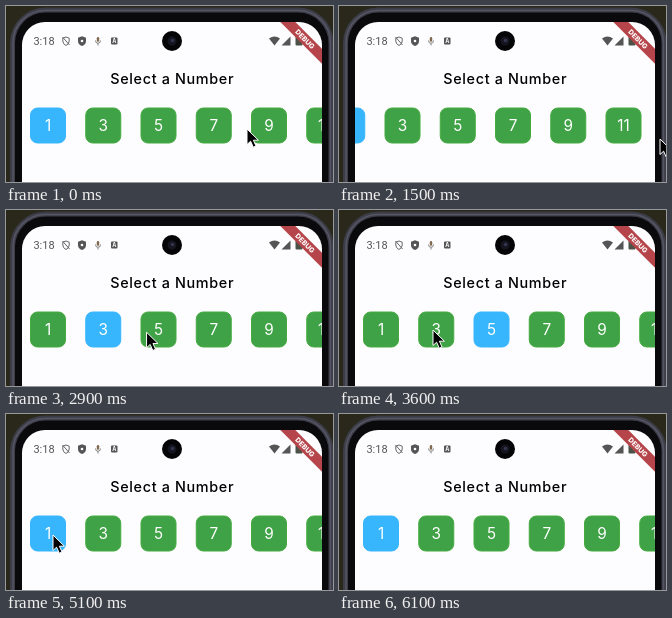
An HTML page for the animation above (6200 ms loop, 327 by 176 pixels).

```html
<!DOCTYPE html>
<html lang="en">
<head>
<meta charset="utf-8">
<style>
  html, body { margin: 0; width: 100%; height: 100%; overflow: hidden; background: #29281a; }
  svg { display: block; width: 327px; height: 176px; }
  text { font-family: Inter, sans-serif; text-anchor: middle; }
  .title { font-size: 14.4px; font-weight: 500; letter-spacing: .65px; }
  .tile rect { fill: #40a246; stroke: #45ab40; }
  .tile.on rect { fill: #38b6fd; stroke: #38b6fd; }
  .tile text { font-size: 15.3px; fill: #fff; }
  .icons { fill: #555; }
  .line { fill: none; stroke: #666; }
</style>
</head>
<body>
<svg viewBox="0 0 327 176">
  <defs>
    <clipPath id="screen"><rect x="16" y="16" width="300" height="200" rx="23"/></clipPath>
  </defs>
  <rect width="327" height="176" fill="#29281a"/>
  <rect x="6.500" y="4" width="318.500" height="240" rx="33" fill="#0a0a0d" stroke="#3d3d49" stroke-width="5"/>
  <rect x="7" y="4.500" width="317.500" height="240" rx="32" fill="none" stroke="#555563" stroke-width="1.500"/>

  <g clip-path="url(#screen)">
    <rect x="16" y="16" width="300" height="160" fill="#fdfcfe"/>
    <g class="icons">
      <text x="38" y="39" style="font:11px Roboto,sans-serif">3:18</text>
      <path class="line" d="M60 31l3.200 1.200v2.800q0 3-3.200 4.500q-3.200-1.500-3.200-4.500v-2.800zM56.500 31l7 8"/>
      <path d="M76 30.300l4 1.500v3.200q0 3.500-4 5q-4-1.500-4-5v-3.200z"/>
      <circle cx="76" cy="35" r="1.300" fill="#fff"/>
      <rect x="90.800" y="31" width="2.400" height="4.800" rx="1.200" fill="#80694f"/>
      <path class="line" d="M89.500 34.500q0 2.800 2.500 2.800t2.500-2.800M92 37.500v2" stroke-width=".8"/>
      <rect x="105" y="31.500" width="6.500" height="7" rx="1"/>
      <text x="108.250" y="37.200" font-size="5.500" font-weight="700" fill="#fff">A</text>
      <path d="M263 32.500q5.500-4 11 0l-5.500 7z"/>
      <path d="M284.500 30.500v9h-9z"/>
      <rect x="289.500" y="30.500" width="7" height="9" rx="1" fill="#4b5348"/>
    </g>
    <circle cx="166" cy="35" r="10" fill="#050507"/>
    <circle cx="166" cy="35" r="4.500" fill="#15151f"/>
    <circle cx="166.500" cy="34.500" r="1.800" fill="#34344f"/>
    <text class="title" x="166.200" y="78.300">Select a Number</text>
    <g id="row"></g>
    <g transform="translate(299 33.200) rotate(45)">
      <rect x="-40" y="-5.300" width="80" height="10.600" fill="#b5454a"/>
      <text y="2.500" font-size="7" font-weight="800" fill="#fff">DEBUG</text>
    </g>
  </g>
  <path id="cursor" d="M0 0v15.500l3.600-3.300l2.700 6l2.700-1.200l-2.600-5.800h5z" fill="#000" stroke="#fff"/>
</svg>
<script>
const LOOP = 6200, STEP = 100, PITCH = 55.25, SCROLL_END = 304, CLICK_DELAY = 200;
const row = document.getElementById('row');
const cursor = document.getElementById('cursor');

for (let i = 0; i < 11; i++) {
  row.innerHTML += `<g class="tile" transform="translate(${42 + i * PITCH} 119.5)">
    <rect x="-17.500" y="-17.500" width="35" height="35" rx="7"/><text y="5">${2 * i + 1}</text></g>`;
}
const tiles = [...row.children];

// Cursor trips; those with a pick end in a click on that tile.
const trips = [
  { from: 0, to: 690, x: 48, y: 135 },
  { from: 1060, to: 1500, x: 321, y: 133 },
  { from: 1700, to: 2300, x: 105, y: 123, pick: 1 },
  { from: 2700, to: 3000, x: 153, y: 122, pick: 2 },
  { from: 3250, to: 3600, x: 94, y: 120, pick: 1 },
  { from: 4100, to: 4500, x: 47, y: 121, pick: 0 },
  { from: 5300, to: 5800, x: 120, y: 190 },
];

function ease(t, from, to) {
  const p = Math.min(1, Math.max(0, (t - from) / (to - from)));
  return p * p * (3 - 2 * p);
}

function draw(now) {
  const t = Math.floor(now % LOOP / STEP) * STEP;
  const scroll = SCROLL_END * (ease(t, 0, 1060) - ease(t, 1060, 1615));
  let x = 241, y = 123, picked = 0;
  for (const trip of trips) {
    const p = ease(t, trip.from, trip.to);
    x += (trip.x - x) * p;
    y += (trip.y - y) * p;
    if (t >= trip.to + CLICK_DELAY) picked = trip.pick ?? picked;
  }
  row.setAttribute('transform', `translate(${-scroll})`);
  cursor.setAttribute('transform', `translate(${x} ${y})`);
  tiles.forEach((tile, i) => tile.classList.toggle('on', i === picked));
  requestAnimationFrame(draw);
}
draw(performance.now());
</script>
</body>
</html>
```
